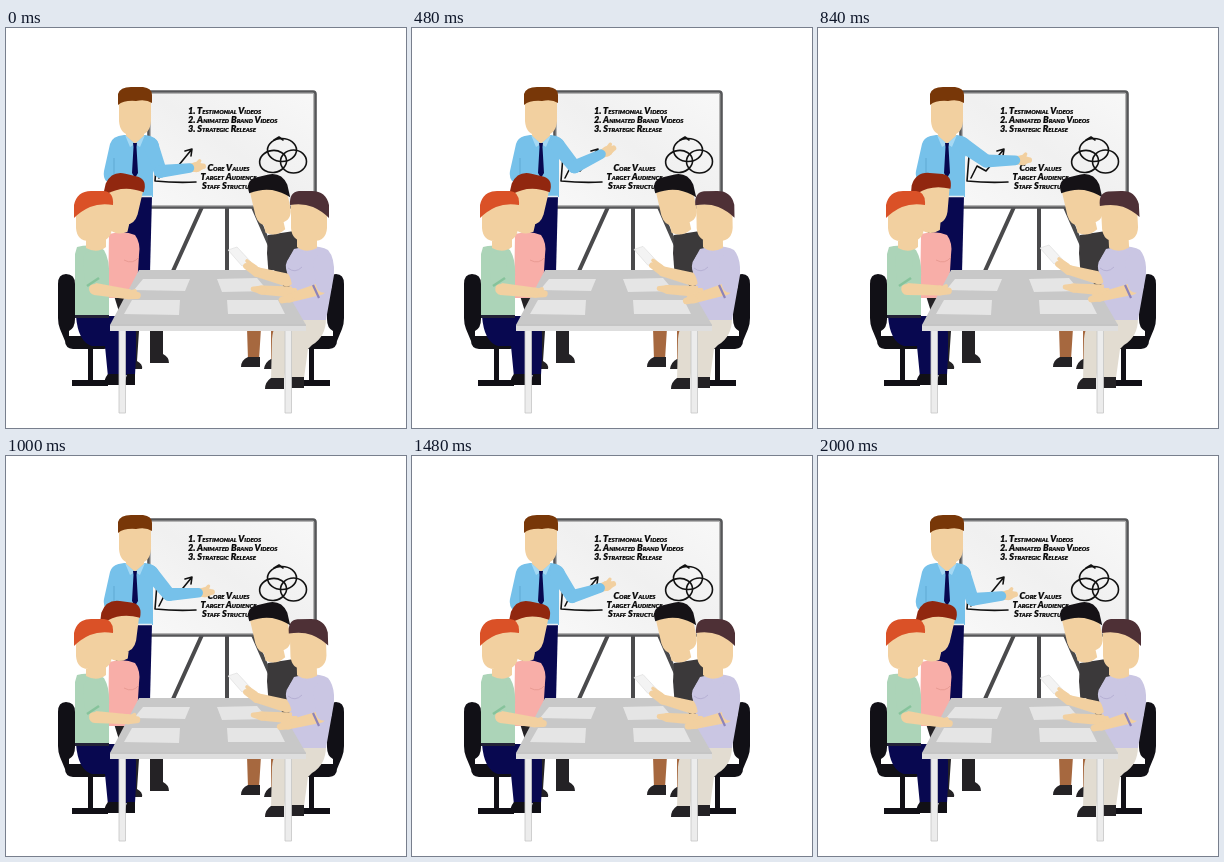
Animation, 400 px wide and 400 px high, one loop 2.08 s. Source, as an HTML page:

```html
<!DOCTYPE html>
<html lang="en">
<head>
<meta charset="utf-8">
<title>Team meeting</title>
<style>
  html, body { margin: 0; width: 100%; height: 100%; overflow: hidden; background: #fff; }
  svg { display: block; width: 100vw; height: 100vh; }
  .note { font: italic 900 9.1px Lato, "Open Sans", sans-serif; font-variant: small-caps; fill: #080808; stroke: #080808; stroke-width: .2; }
  .ink { fill: none; stroke: #111; stroke-width: 1.6; stroke-linecap: round; stroke-linejoin: round; }
  .skin { fill: #f2d0a0; }
  .blue { fill: #76c1ea; }
  .mint { fill: #acd4b8; }
  .pink { fill: #f8aea8; }
  .lilac { fill: #cac6e3; }
  .navy { fill: #080850; }
  .char { fill: #3b393a; }
  .beige { fill: #e2dcd1; }
  .tan { fill: #a6683f; }
  .black { fill: #111016; }
  .dark { fill: #242225; }
  .sheet { fill: #e5e5e5; }
</style>
</head>
<body>
<svg viewBox="0 0 400 400">
  <defs>
    <linearGradient id="board" x1="0" y1="1" x2="1" y2="0">
      <stop offset="0" stop-color="#f8f8f8"/>
      <stop offset=".5" stop-color="#f0f0f0"/>
      <stop offset="1" stop-color="#f8f8f8"/>
    </linearGradient>
    <g id="chair" class="black">
      <path d="M52 256Q52 246 60 246Q69 246 69 256V291Q69 300 63 303V308H99Q104 309 104 314Q104 321 98 321H67Q59 320 59 313L54 301Q52 296 52 290Z"/>
      <path d="M82 320H87V352H102V358H66V352H82Z"/>
    </g>
    <!-- Faces right; the origin is the base of the neck -->
    <g id="head">
      <path class="skin" d="M-18 -42H18V-18Q17 -5 5 -5H-5Q-17 -5 -18 -18ZM-8 -10H12V1Q3 8 -8 2Z"/>
      <path fill="currentColor" d="M-20 -28V-41Q-17 -55 -3 -55H10Q20 -54 19 -41Q6 -43 -4 -39Q-13 -35 -20 -28Z"/>
    </g>
  </defs>

  <!-- Whiteboard -->
  <path d="M196 179L167 243M221 179V243M247 179L275 243" fill="none" stroke="#4a4a4c" stroke-width="4"/>
  <rect x="142.500" y="63.500" width="167" height="116" rx="2.5" fill="url(#board)" stroke="#555658" stroke-width="2.6"/>
  <rect x="144.500" y="65.500" width="163" height="112" fill="none" stroke="#b4b4b4" stroke-width="1"/>
  <g class="note">
    <text x="182" y="86">1. Testimonial Videos</text>
    <text x="182" y="95">2. Animated Brand Videos</text>
    <text x="182" y="104">3. Strategic Release</text>
    <g text-anchor="middle">
      <text x="222.5" y="143">Core Values</text>
      <text x="222.5" y="152">Target Audience</text>
      <text x="223" y="161">Staff Structure</text>
    </g>
  </g>
  <g class="ink">
    <path d="M151 128L149 153Q170 155 190 154M153 150L159 138L168 143L186 121M179 123L186 121L185 128"/>
    <ellipse cx="276" cy="122" rx="14.5" ry="11.5"/>
    <ellipse cx="267" cy="133.5" rx="13.5" ry="11" transform="rotate(-8 267 133)"/>
    <ellipse cx="287.5" cy="133.5" rx="13" ry="11.5"/>
    <path d="M268 112L273 109L277 112"/>
  </g>

  <!-- Presenter -->
  <path class="navy" d="M108 168H146L144 245H112Z"/>
  <path class="blue" d="M118 107H139Q151 108 153 117L147 129V169H108V146L110 157L100 153Q97 149 98 143L104 116Q106 108 118 107Z"/>
  <path d="M108 130V154" stroke="#5ea9d3" fill="none"/>
  <path d="M109 168.5H146" stroke="#e8edf2" stroke-width="1.6"/>
  <path class="skin" d="M120 98H138V108L129 116L120 108Z"/>
  <path d="M119 107L129 116L124 119ZM139 107L129 116L134 119Z" fill="#a5d9f4"/>
  <path class="navy" d="M127 115H131L130.5 119L132 145L129 150L126 145L127.5 119Z"/>
  <path class="skin" d="M113 72H145V93Q144 106 134 107H124Q114 106 113 93Z"/>
  <path d="M112 77V66Q114 59 125 59H137Q146 60 146 67V75Q140 71 130 73Q118 72 112 77Z" fill="#783708"/>
  <g id="speakerArm"></g>

  <use href="#chair"/>
  <use href="#chair" transform="translate(390) scale(-1 1)"/>

  <!-- Far left -->
  <path class="dark" d="M105 258H140V303H157V326Q163 329 163 335H144V303H133L131 333Q137 336 136 341H119V303Z"/>
  <path class="pink" d="M103 206Q118 202 129 207Q135 215 133 227L132 243L130 270H102Z"/>
  <path d="M118 232Q127 237 133 229" fill="none" stroke="#e99b93"/>
  <use id="farLeftHead" href="#head" color="#91270f"/>

  <!-- Far right -->
  <path class="tan" d="M241 300H255L253 332H242ZM265 300H279L276 334H265Z"/>
  <path class="dark" d="M242 329H254V339H235Q235 332 242 329ZM265 331H279V341H258Q259 334 265 331Z"/>
  <path class="char" d="M262 207L288 203L297 220V265H264L261 225Z"/>
  <use id="farRightHead" href="#head" color="#151216" transform="translate(271 201) scale(-1 1) rotate(13)"/>

  <!-- Near left -->
  <path class="navy" d="M70 288H112Q130 291 130 306V329L129 347H119L118 349H102L99 318H86Q72 314 70 288Z"/>
  <path class="black" d="M102 346H119V357H98Q98 351 102 346ZM121 346H129V357H118Z"/>
  <path class="mint" d="M71 219Q88 215 98 222Q104 232 103 249V289H69V226Z"/>
  <path d="M69 288.500H103" stroke="#222237" stroke-width="3"/>
  <use href="#head" color="#da5127" transform="translate(88 218)"/>

  <!-- Near right -->
  <path class="beige" d="M280 290H320Q320 309 306 317L302 321L298 350H285L282 322L278 352H265L266 311Q267 295 280 290Z"/>
  <path class="dark" d="M265 350H278V361H259Q259 354 265 350ZM285 349H298V360H284Z"/>
  <path class="lilac" d="M288 221Q309 215 322 222Q329 230 328 247L320 292H283Q286 263 281 244Q278 236 283 230Z"/>
  <use id="nearRightHead" href="#head" color="#4e3036"/>

  <!-- Table -->
  <path d="M113 300H119.500V385H113ZM279 300H285.500V385H279Z" fill="#ececec" stroke="#c6c6c6" stroke-width=".8"/>
  <path d="M133 242H268L300 297H104Z" fill="#c8c8c8"/>
  <path d="M104 297H300V303H104Z" fill="#dedede"/>
  <path d="M104 297.300H300" stroke="#b8b8b8" stroke-width=".8"/>
  <path class="sheet" d="M137 251H184L179 263L128 262ZM126 272H174L173 287L118 286ZM211 251L251 250L262 263L216 264ZM221 272H272L279 286H222Z"/>

  <g id="farRightArms"></g>
  <g id="nearLeftArm"></g>
  <g id="nearRightArm"></g>
</svg>
<script>
const LOOP = 2080, STEP = 40;
const $ = id => document.getElementById(id);
const mix = (a, b, k) => a.map((v, i) => v + (b[i] - v) * k);

// Steady motion through keys of [time, ...values].
const track = (...keys) => t => {
  const next = keys.findIndex(key => key[0] > t);
  if (next < 0) return keys[keys.length - 1].slice(1);
  const a = keys[next - 1], b = keys[next];
  return mix(a, b, (t - a[0]) / (b[0] - a[0])).slice(1);
};

// Tapered limb with round ends.
function limb(cls, [ax, ay], ra, [bx, by], rb) {
  const angle = Math.atan2(by - ay, bx - ax), nx = Math.sin(angle), ny = -Math.cos(angle);
  const at = (x, y, r) => `${(x + nx * r).toFixed(2)} ${(y + ny * r).toFixed(2)}`;
  return `<path class="${cls}" d="M${at(ax, ay, ra)}L${at(bx, by, rb)}A${rb} ${rb} 0 0 1 ${at(bx, by, -rb)}`
    + `L${at(ax, ay, -ra)}A${ra} ${ra} 0 0 1 ${at(ax, ay, ra)}Z"/>`;
}

// Elbow of a two-bone arm; the elbow hangs below the line to the hand.
function elbowOf([sx, sy], [hx, hy], upper, fore) {
  const reach = Math.min(Math.hypot(hx - sx, hy - sy), upper + fore - .1);
  const bend = Math.acos((upper ** 2 + reach ** 2 - fore ** 2) / (2 * upper * reach));
  const angle = Math.atan2(hy - sy, hx - sx) + bend;
  return [sx + upper * Math.cos(angle), sy + upper * Math.sin(angle)];
}

const speakerTip = track([0, 200, 138], [160, 202, 131], [480, 204, 119], [840, 214, 132],
  [1180, 203, 140], [1480, 204, 127], [1620, 204, 120], [2000, 200, 138]);
const farLeftTilt = track([0, 0], [480, 0], [840, -8], [1200, -3], [1480, -1], [2000, 0]);
const nearRightTilt = track([0, 0], [160, -6], [480, -1], [840, -3], [1200, 0], [2000, 0]);
const paperLift = track([0, 0], [480, -.6], [840, -2], [1200, -2], [1480, -.5], [2000, 0]);
const nearLeftTip = track([0, 134, 268], [480, 135, 266], [840, 133, 263],
  [1200, 134, 265], [1480, 134, 268], [2000, 134, 268]);
const nearRightTip = track([0, 273, 273], [160, 272, 271], [480, 271, 274], [840, 270, 272],
  [1200, 272, 271], [1480, 273, 271], [1680, 273, 273], [2000, 273, 273]);

function speakerArm(tip) {
  const shoulder = [145, 117], elbow = elbowOf(shoulder, tip, 28, 46);
  const along = k => mix(elbow, tip, k);
  const thumb = along(.84);
  return limb("skin", along(.62), 4, along(.8), 5)
    + limb("skin", along(.78), 5, along(.94), 2.8)
    + limb("skin", along(.76), 3, [thumb[0] + 1, thumb[1] - 6], 1.7)
    + limb("blue", shoulder, 7.5, elbow, 6.5)
    + limb("blue", elbow, 6.5, along(.64), 4.8);
}

function nearLeftArm(tip) {
  const elbow = [89, 261], wrist = mix(elbow, tip, .75);
  return limb("skin", elbow, 6, wrist, 5)
    + limb("skin", wrist, 5, mix(elbow, tip, .94), 3.5)
    + limb("skin", wrist, 3, [tip[0] - 5, tip[1] - 5], 2)
    + limb("mint", [86, 232], 9, [86, 249], 7.5)
    + '<path d="M81 258L93 250" stroke="#86c39b" stroke-width="2.5"/>';
}

function nearRightArm(tip) {
  const elbow = [314, 261], wrist = mix(elbow, tip, .74);
  return limb("skin", elbow, 6, wrist, 4.6)
    + limb("skin", wrist, 4.6, mix(elbow, tip, .93), 3.2)
    + limb("skin", wrist, 3, [tip[0] + 6, tip[1] - 5], 2)
    + limb("lilac", [317, 235], 9.5, [318, 257], 8)
    + '<path d="M307 257L313 270" stroke="#8d83b9" stroke-width="2.2"/>';
}

function farRightArms(lift) {
  return `<g transform="translate(0 ${lift})"><path d="M222 222L231 219L245 234L236 238Z" fill="#f3f3f3" stroke="#dadada" stroke-width=".6"/>`
    + limb("skin", [281, 252], 6.5, [251, 244], 5)
    + limb("skin", [251, 244], 5, [240, 238], 3)
    + limb("skin", [249, 240], 3, [241, 233], 1.8)
    + limb("skin", [286, 264], 5.5, [255, 262], 4.5)
    + limb("skin", [256, 262], 4.5, [247, 261], 2.5) + "</g>"
    + '<path class="lilac" d="M289 222L304 225V260H286Q286 251 281 244Q278 234 289 222Z"/>'
    + '<path d="M282 240Q289 246 296 239" fill="none" stroke="#b6b0d4"/>';
}

function draw(t) {
  $("speakerArm").innerHTML = speakerArm(speakerTip(t));
  $("nearLeftArm").innerHTML = nearLeftArm(nearLeftTip(t));
  $("nearRightArm").innerHTML = nearRightArm(nearRightTip(t));
  $("farRightArms").innerHTML = farRightArms(paperLift(t)[0]);
  $("farLeftHead").setAttribute("transform", `translate(110 200) rotate(${13 + farLeftTilt(t)[0]})`);
  $("nearRightHead").setAttribute("transform", `translate(303 218) rotate(${nearRightTilt(t)[0]}) scale(-1 1)`);
}

const start = performance.now();
function tick() {
  const t = (performance.now() - start) % LOOP;
  draw(Math.floor(t / STEP) * STEP);
  requestAnimationFrame(tick);
}
draw(0);
requestAnimationFrame(tick);
</script>
</body>
</html>
```
